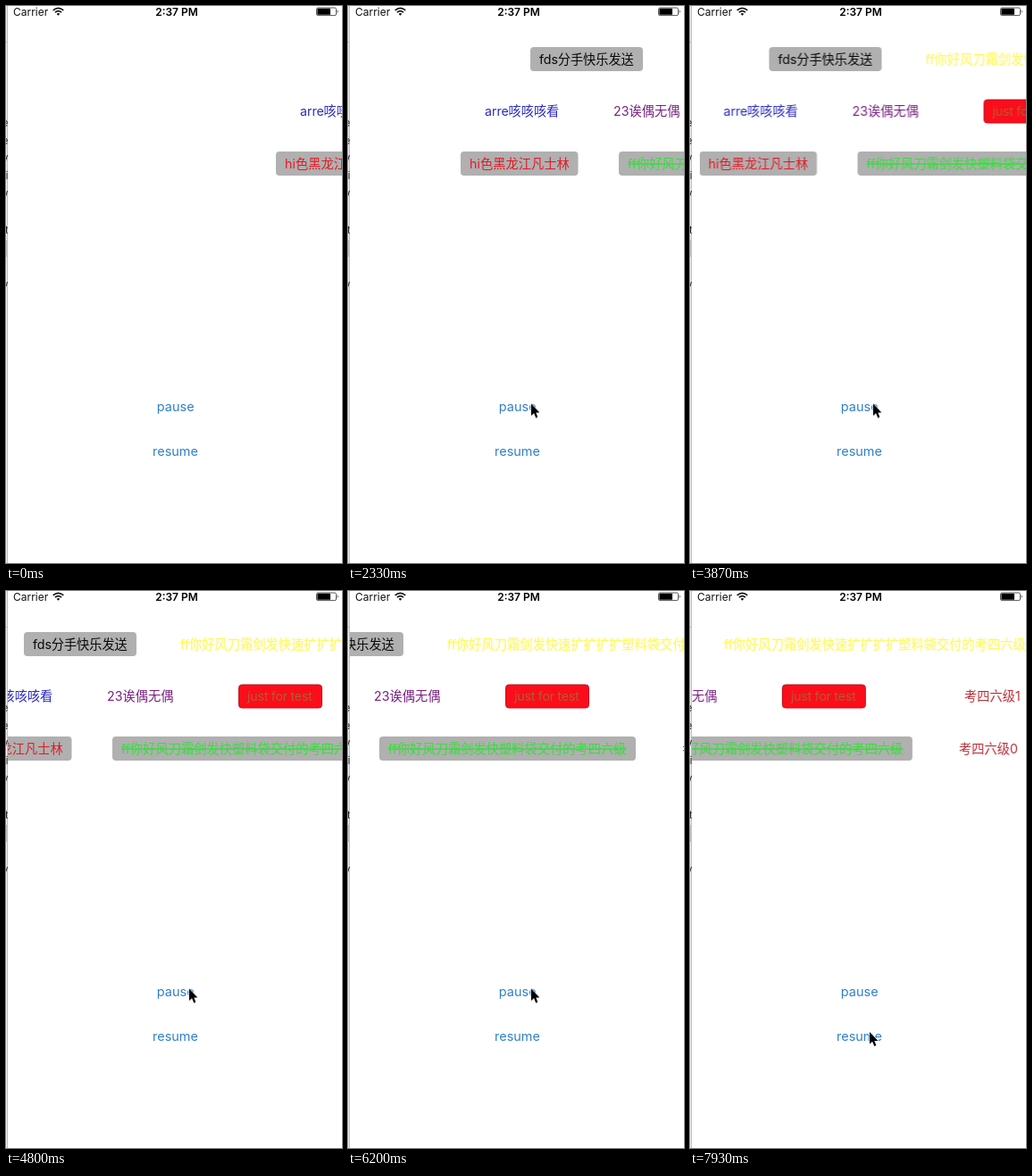
An HTML page for the animation above (8000 ms loop, 376 px wide and 624 px high).

```html
<!DOCTYPE html>
<html lang="zh-CN">
<head>
<meta charset="utf-8">
<title>Scrolling comments</title>
<style>
  html, body { margin: 0; width: 100%; height: 100%; overflow: hidden; background: #fff; }
  svg { display: block; width: 376px; height: 624px; }
  text { font: 14.25px Inter, "Noto Sans CJK SC", "Noto Sans CJK", sans-serif; white-space: pre; }
  .status text { font-size: 12px; fill: #111; }
  .status .time { font-weight: 600; fill: #000; text-anchor: middle; }
  .button { font-size: 14.5px; fill: #2f80c8; text-anchor: middle; }
  .behind text { font-size: 11px; fill: #222; text-anchor: end; }
  .pill { fill: #b0b0b0; }
  .struck { text-decoration: line-through; text-decoration-thickness: 1px; }

  /* 120 screen updates per loop; the small lead keeps updates on time */
  .track, .cursor { animation: 8s -4ms infinite; }
  .track { animation-name: scroll; }
  .cursor { animation-name: point; }

  @keyframes scroll {
    0%        { transform: translateX(0); animation-timing-function: steps(24); }
    20%       { transform: translateX(-121px); animation-timing-function: steps(21); }
    37.5%     { transform: translateX(-226px); animation-timing-function: steps(13); }
    48.3333%  { transform: translateX(-291.5px); animation-timing-function: steps(14); }
    60%       { transform: translateX(-360px); animation-timing-function: steps(17); }
    74.1667%  { transform: translateX(-444px); animation-timing-function: steps(15); }
    86.6667%  { transform: translateX(-444px); animation-timing-function: steps(16); }
    100%      { transform: translateX(-522px); }
  }
  @keyframes point {
    0%        { transform: translate(190px, 640px); animation-timing-function: step-end; }
    14.1667%  { transform: translate(190px, 602px); animation-timing-function: steps(7); }
    20%       { transform: translate(195.5px, 462px); animation-timing-function: steps(3); }
    22.5%, 77.5% { transform: translate(205px, 445.5px); animation-timing-function: steps(10); }
    85.8333%, 100% { transform: translate(201px, 494px); }
  }
</style>
</head>
<body>
<svg viewBox="0 0 376 624">
  <defs>
    <clipPath id="screen"><rect x="2" width="374" height="624"/></clipPath>
    <clipPath id="edge"><rect width="2.5" height="624"/></clipPath>
  </defs>
  <rect width="376" height="624" fill="#fff"/>

  <g class="behind" clip-path="url(#edge)">
    <rect width="2" height="624" fill="#f3f3f3"/>
    <rect y="40" width="2" height="1" fill="#aaa"/>
    <rect y="262" width="2" height="19" fill="#c4c4c4"/>
    <rect x="1" width="1" height="624" fill="#bcbcbc"/>
    <text x="2.5" y="135">e</text>
    <text x="2.5" y="155">e</text>
    <text x="2.5" y="174">v</text>
    <text x="2.5" y="194">i</text>
    <text x="2.5" y="214">v</text>
    <text x="2.5" y="255">t</text>
    <text x="2.5" y="316">y</text>
  </g>

  <g class="status">
    <text x="8" y="10.5">Carrier</text>
    <g fill="none" stroke="#111" stroke-width="1.6">
      <path d="M52.7 4.9Q58.5 -.3 64.3 4.9M54.9 7.1Q58.5 4 62.1 7.1"/>
      <path d="M58.5 10.8L56.6 8.7Q58.5 7.3 60.4 8.7Z" fill="#111" stroke="none"/>
    </g>
    <text class="time" x="191" y="10.5">2:37 PM</text>
    <rect x="347.5" y="2" width="22" height="8.6" rx="1.6" fill="#fff" stroke="#555" stroke-width="1"/>
    <rect x="348.4" y="2.8" width="14.6" height="7" rx=".6"/>
    <path d="M370.7 4.6Q373 6.3 370.7 8Z" fill="#555"/>
  </g>

  <g clip-path="url(#screen)">
    <g class="track">
      <rect class="pill" x="380" y="46" width="126" height="27" rx="4"/>
      <text x="390" y="64.7" fill="#0a0a0a" letter-spacing="-.1">fds分手快乐发送</text>
      <text x="555" y="64.7" fill="#fff863" stroke="#fff863" stroke-width=".25">ff你好风刀霜剑发快速扩扩扩扩塑料袋交付的考四六级</text>

      <text x="329" y="123.2" fill="#2a2ac0" letter-spacing="-.1">arre咳咳咳看</text>
      <text x="473" y="123.2" fill="#7a2080">23诶偶无偶</text>
      <rect x="620.5" y="105" width="93" height="26" rx="3.5" fill="#fc0d1b" stroke="#bd1420"/>
      <text x="630" y="123.2" fill="#b45c34" letter-spacing="-.25">just for test</text>
      <text x="824" y="123.2" fill="#bb2a33">考四六级1</text>

      <rect class="pill" x="302" y="163" width="131.5" height="27" rx="4"/>
      <text x="312" y="181.7" fill="#e41a26">hi色黑龙江凡士林</text>
      <rect class="pill" x="479" y="163" width="287" height="27" rx="4"/>
      <text class="struck" x="489" y="181.7" fill="#3bdc40">ff你好风刀霜剑发快塑料袋交付的考四六级</text>
      <text x="818" y="181.7" fill="#bb2a33">考四六级0</text>
    </g>
  </g>

  <text class="button" x="189.7" y="453.5">pause</text>
  <text class="button" x="189.5" y="503.5">resume</text>

  <path class="cursor" d="M0 0V13.6L3.1 10.7 5.3 16 7.4 15.1 5.3 9.9H9.4Z" stroke="#fff" stroke-width="1.2" paint-order="stroke"/>
</svg>
</body>
</html>
```
